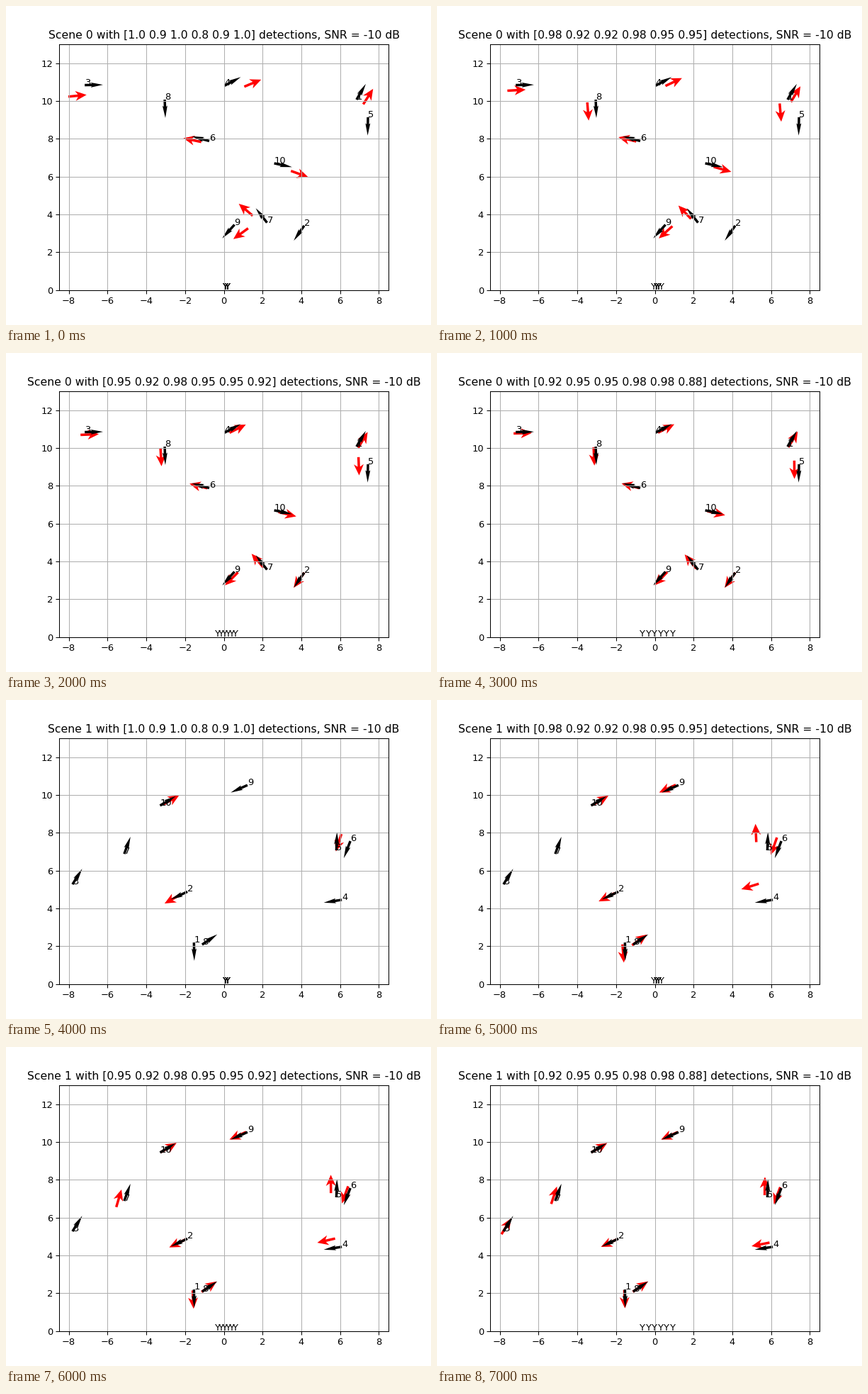
These frames come from a looping animation (600 by 450 pixels, 8 s). A matplotlib script:

```python
import numpy as np
import matplotlib.pyplot as plt
from matplotlib.animation import FuncAnimation

# Per scene, in order of first detection:
# label: (x, y, heading in degrees, bearing error in degrees)
SCENES = [
    {1: (6.85, 10.07, 59.5, -2), 3: (-7.18, 10.84, 1, 4.6),
     4: (0.04, 10.81, 28, -5.4), 6: (-0.75, 7.88, 165, 3),
     7: (2.23, 3.56, 128, 11.3), 9: (0.55, 3.45, 228, -12),
     10: (2.6, 6.7, -12, -7.6), 5: (7.44, 9.14, 269, 12),
     8: (-3.05, 10.07, 272, 5), 2: (4.15, 3.4, 235, 0)},
    {2: (-1.88, 4.88, 205, 4.2), 6: (6.53, 7.56, 249, 3.4),
     10: (-3.29, 9.44, 31, -1), 1: (-1.54, 2.19, 271, 7),
     4: (6.09, 4.45, 189, 17), 5: (5.81, 7.07, 88, 9),
     8: (-1.12, 2.08, 34, 3), 9: (1.22, 10.52, 204, 1.5),
     7: (-5.14, 6.88, 70, 14), 3: (-7.81, 5.27, 58, 9)},
]
DETECTED = [(7, 9, 10, 10), (3, 8, 9, 10)]
RATES = ["1.0 0.9 1.0 0.8 0.9 1.0", "0.98 0.92 0.92 0.98 0.95 0.95",
         "0.95 0.92 0.98 0.95 0.95 0.92", "0.92 0.95 0.95 0.98 0.98 0.88"]
SPACING = [0.13, 0.13, 0.18, 0.314]   # antenna slot width
ANTENNAS = 6

fig, ax = plt.subplots(figsize=(6.4, 4.8), dpi=93.75)


def arrows(x, y, heading, **style):
    a = np.radians(heading)
    ax.quiver(x, y, np.cos(a), np.sin(a), scale=18, width=0.0075, **style)


def rotate(x, y, degrees):
    a = np.radians(degrees)
    return x * np.cos(a) - y * np.sin(a), x * np.sin(a) + y * np.cos(a)


def draw(i):
    scene, step = divmod(i, len(RATES))
    targets = SCENES[scene]
    x, y, heading, error = np.array(list(targets.values())).T

    ax.clear()
    ax.set(xlim=(-8.5, 8.5), ylim=(0, 13),
           xticks=range(-8, 9, 2), yticks=range(0, 13, 2))
    ax.grid(True)
    ax.set_title(f"Scene {scene} with [{RATES[step]}] detections, SNR = -10 dB")

    # A wider array halves the bearing error, which turns the whole estimate
    seen = slice(DETECTED[scene][step])
    turn = error * 0.5 ** step
    ex, ey = rotate(x, y, turn)
    arrows(ex[seen], ey[seen], (heading + turn)[seen], color="red",
           headwidth=4, headlength=4.5, headaxislength=3.5)
    arrows(x, y, heading, color="black", headwidth=2)
    for label, (tx, ty, *_) in targets.items():
        ax.text(tx, ty, str(label))

    # Narrow arrays share slots, so some antennas overlap
    last = min(ANTENNAS, 2 * step + 2) - 1
    for slot in np.round(np.linspace(0, last, ANTENNAS)):
        ax.text((slot - last / 2) * SPACING[step], 0, "Y")


anim = FuncAnimation(fig, draw, frames=8, init_func=lambda: None,
                     interval=1000, repeat=True)
plt.show()
```
